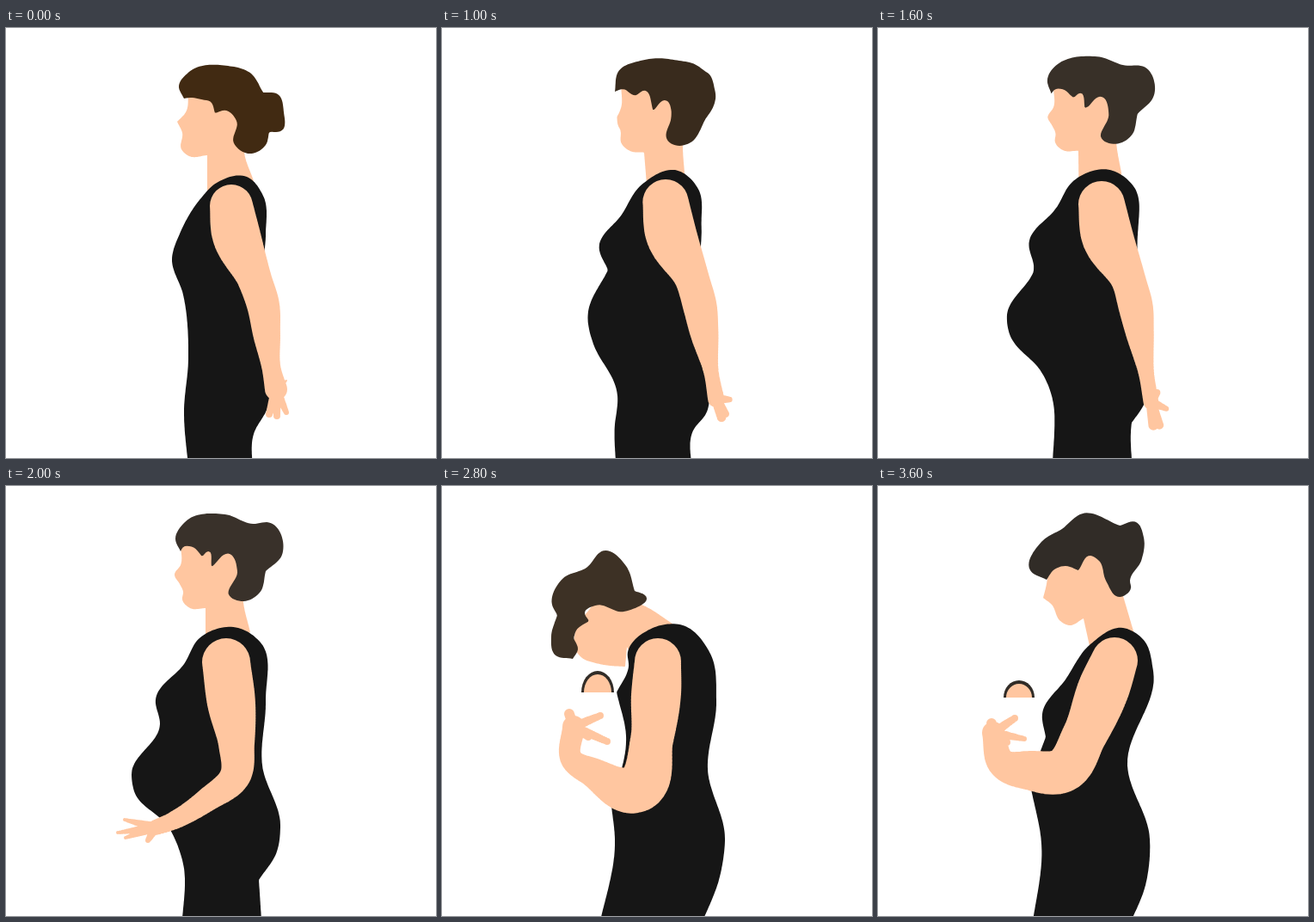
An HTML page for the animation above (3800 ms loop, 500 by 500 pixels).

```html
<!DOCTYPE html>
<html lang="en">
<head>
<meta charset="utf-8">
<title>Motherhood</title>
<style>
  html, body { margin: 0; width: 100%; height: 100%; overflow: hidden; background: #fff; }
  svg { display: block; width: 100%; height: 100%; }
</style>
</head>
<body>
<svg viewBox="0 0 500 500"></svg>
<script>
const LOOP = 3800, STEP = 200, TURN = 3000, SAMPLES = 160;
const SKIN = '#ffc6a0', BLACK = '#161616', BABY_HAIR = '#312c27';

const early = power => u => 1 - (1 - u) ** power;
const late = power => u => u ** power;
const settle = u => u * (3 - u) / 2;
const linear = u => u;

// Outlines are closed curves: "!" is a corner, "|" a landmark kept aligned while morphing.
// The arm is a brush path of x,y,radius from shoulder to palm; tips are the fingers.
const poses = [
  {
    at: 0, tint: [65, 42, 18], ease: { head: late(3), arm: early(4) },
    head: '|234,195! 234,148! 213,149 204,141 205,122 199,109! 209,98 |212,72! 245,60 285,105 277,143 288,178!',
    hair: '|207,82! 201,68 213,51 258,44 285,53 299,75! 316,77 323,98 321,119 306,121! 302,136 282,146 265,134 268,108 256,96 243,99! 238,86 227,83! 215,81',
    dress: '|213,520! 207,445 212,385 206,310 193,268 203,237 225,200 245,180 |280,173 299,195 302,240 296,300 308,385 304,442 288,472 |287,520!',
    arm: '262,207,25 267,238,28 289,292,20 299,322,19 303,355,16 309,398,11 314,420,13',
    tips: '326,447,3 315,451,4 306,449,4 326,410,1'
  },
  {
    at: 600, tint: [65, 42, 18],
    head: '|240,190! 233,144! 216,143 207,130 208,120 203,108 209,99 |211,62! 245,55 282,100 277,138 285,170!',
    hair: '|209,68! 216,49 259,35 286,43 305,41 309,78 320,106 300,127 276,137 261,122 267,94 258,86 243,96! 235,69 229,77! 221,75! 217,66',
    dress: '|213,520! 208,470 213,410 190,355 185,320 199,280! 188,255 212,216 235,180 |275,165 298,188 303,230 299,300 313,405 308,444 291,466 |291,520!',
    arm: '260,198,26 265,232,29 290,290,20 300,322,19 305,352,17 315,402,8 320,424,11',
    tips: '331,410,4 333,422,3 333,434,4 323,443,5'
  },
  {
    at: 1200, tint: [53, 44, 34], ease: { body: early(2), head: early(2), arm: late(8) },
    head: '|238,190! 236,145! 220,143 209,135 208,120! 201,105! 207,93 |207,70! 240,60 275,85 281,130 281,180!',
    hair: '|197,77! 199,52 226,39 268,35 302,48 312,50 321,70 302,101! 290,132 262,133 266,106 261,83 247,97! 236,75 222,79 211,73',
    dress: '|198,520! 197,465 200,430 167,368 161,340 190,282! 180,255 207,218 230,184 |273,166 297,185 301,230 297,300 311,420 308,448 292,470 |291,520!',
    arm: '260,205,27 266,240,30 292,295,20 300,325,20 304,350,17 313,405,9 318,435,9',
    tips: '336,443,3 328,462,5 321,462,6 325,424,4'
  },
  {
    at: 2000, tint: [57, 49, 42],
    head: '|232,190! 232,142! 214,142 205,132 206,123 202,114 196,103 203,92 |203,68! 240,55 277,95 276,135 284,170!',
    hair: '|203,76! 197,62 208,42 255,33 286,44 308,43 321,80 302,99! 295,124 276,134 260,128 269,99 260,79 239,94! 235,76 228,82! 217,71 206,71',
    dress: '|204,520! 205,435 190,398 149,355 146,335 179,277 174,248 207,207 226,176 |270,165 296,182 302,250 298,325 319,395 315,425 294,458! |298,520!',
    arm: '256,205,28 262,252,28 268,300,21 267,336,18 235,364,14 188,392,10 174,397,9',
    tips: '138,388,2 130,403,2 139,409,2 165,412,3'
  },
  {
    at: 2400, tint: [49, 44, 39], ease: { body: settle, head: settle, arm: settle },
    head: '|248,195! 239,154! 222,162 212,157 202,138 192,130! 196,114 |198,90! 240,70 268,90 285,128! 298,172!',
    hair: '|196,109! 177,98 190,65 214,50! 238,32 281,46! 300,42 309,60 306,87 293,110 294,119 281,129 265,110 257,87 247,81 233,98! 218,93 205,97',
    dress: '|178,520! 190,415 178,352! 189,308! 195,292! 191,265 218,225 247,184 |285,165 308,178 320,215 290,325 316,410 312,460 |288,520!',
    arm: '275,203,27 263,234,30 240,290,26 214,331,26 178,331,23 145,323,17 134,287,13',
    tips: '159,270,4 132,276,6 170,294,3 150,298,4',
    baby: [164, 246, 18, 20]
  },
  {
    at: 2800, tint: [61, 49, 37],
    head: '|222,200! 215,187! 213,210! 196,209 179,206 163,200 155,190 155,170 |166,150! 185,130 232,138 268,160!',
    hair: '|152,201! 131,196 127,175 134,150! 128,138 140,108 168,95 189,75 214,93 224,122! 237,128 212,146 178,139 166,147 171,157! 156,168 153,177! 158,190',
    dress: '|181,520! 201,410 197,372! 214,290 203,240! 217,210 216,193 243,166 |280,162 312,195 319,250 309,330 329,410 324,450 |297,520!',
    arm: '251,204,27 249,242,29 244,295,25 226,352,28 175,333,17 151,318,13 153,280,13',
    tips: '184,267,4 148,265,6 192,297,4 170,292,4',
    baby: [181, 240, 19, 25]
  }
];

const mix = (a, b, t) => a + (b - a) * t;
const mixAll = (a, b, t) => a.map((v, i) => mix(v, b[i], t));
const gap = (a, b) => Math.hypot(...a.map((v, i) => b[i] - v));
const toward = (a, b) => a.map((v, i) => (b[i] - v) / (gap(a, b) || 1));

const parse = text => text.split(' ').map(s => ({
  p: s.replace(/[|!]/g, '').split(',').map(Number),
  corner: s.endsWith('!'),
  mark: s.startsWith('|')
}));

// Points of the smooth curve from node i to the next one
function segment(nodes, i, closed) {
  const count = nodes.length;
  const at = k => nodes[(k + count) % count].p;
  const a = at(i), b = at(i + 1), len = gap(a, b), chord = toward(a, b);
  const slope = k => {
    const end = !closed && (k === 0 || k === count - 1);
    if (end || nodes[k % count].corner) return chord;
    const before = gap(at(k - 1), at(k)), after = gap(at(k), at(k + 1));
    const u = toward(at(k - 1), at(k)), v = toward(at(k), at(k + 1));
    const sum = u.map((n, c) => n * after + v[c] * before);
    const size = Math.hypot(...sum) || 1;
    return sum.map(n => n / size);
  };
  const m = slope(i), n = slope(i + 1);
  return Array.from({ length: 17 }, (_, k) => {
    const t = k / 16, u = t * t * (3 - 2 * t);
    const v = t * (1 - t) ** 2 * len, w = t * t * (t - 1) * len;
    return a.map((x, c) => mix(x, b[c], u) + m[c] * v + n[c] * w);
  });
}

function evenly(pts) {
  const dist = [0];
  for (let i = 1; i < pts.length; i++) dist.push(dist[i - 1] + gap(pts[i - 1], pts[i]));
  let j = 1;
  return Array.from({ length: SAMPLES }, (_, i) => {
    const d = dist.at(-1) * i / (SAMPLES - 1);
    while (j < pts.length - 1 && dist[j] < d) j++;
    return mixAll(pts[j - 1], pts[j], (d - dist[j - 1]) / (dist[j] - dist[j - 1] || 1));
  });
}

function outline(text) {
  const nodes = parse(text), runs = [];
  nodes.forEach((node, i) => {
    if (node.mark) runs.push([]);
    runs.at(-1).push(...segment(nodes, i, true));
  });
  return runs.flatMap(evenly);
}

const polygon = pts => 'M' + pts.map(p => p.map(n => n.toFixed(1)).join(' ')).join('L') + 'Z';

const disc = ([x, y, r]) =>
  `M${(x - r).toFixed(2)} ${y.toFixed(2)}a${r} ${r} 0 1 1 ${2 * r} 0a${r} ${r} 0 1 1 ${-2 * r} 0Z`;

function brush(points) {
  const nodes = points.map(p => ({ p }));
  return nodes.slice(1).flatMap((_, i) => segment(nodes, i, false)).map(disc).join('');
}

const dome = (x, y, rx, ry) => `M${x - rx} ${y}A${rx} ${ry} 0 0 1 ${x + rx} ${y}Z`;

const shapes = poses.map(({ head, hair, dress, arm, tips, baby, tint }) => ({
  head: outline(head), hair: outline(hair), dress: outline(dress),
  arm: parse(arm).map(n => n.p), tips: parse(tips).map(n => n.p), baby, tint
}));

function compose(ms) {
  const time = Math.min(ms, 2 * TURN - ms);
  let i = poses.length - 2;
  while (poses[i].at > time) i--;
  const u = (time - poses[i].at) / (poses[i + 1].at - poses[i].at);
  const ease = poses[i].ease || {};
  const blend = (key, part) => {
    const a = shapes[i][key], b = shapes[i + 1][key], t = (ease[part] || linear)(u);
    return Array.isArray(a) && Array.isArray(a[0]) ? a.map((p, k) => mixAll(p, b[k], t)) : mixAll(a || b, b, t);
  };

  // The hanging arm swings back once before it reaches forward
  const swing = i === 2 ? 20 * Math.max(0, Math.sin(2 * Math.PI * u)) : 0;
  const swung = ([x, y, r]) => [x + swing * Math.max(0, (y - 200) / 250), y, r];
  const arm = blend('arm', 'arm').map(swung), tips = blend('tips', 'arm').map(swung);
  const [px, py] = arm.at(-1);
  const fingers = tips.map(tip => brush([[px, py, 6], tip])).join('');

  const hasBaby = shapes[i].baby || (shapes[i + 1].baby && u >= .5);
  const [x, y, rx, ry] = hasBaby ? blend('baby', 'body') : [0, 0, 0, 0];
  return [
    [SKIN, polygon(blend('head', 'head'))],
    [`rgb(${blend('tint', 'head').map(Math.round)})`, polygon(blend('hair', 'head'))],
    [BLACK, polygon(blend('dress', 'body'))],
    [BABY_HAIR, hasBaby ? dome(x, y, rx, ry) : ''],
    [SKIN, hasBaby ? dome(x, y, rx - 3, ry - 4) : ''],
    [SKIN, brush(arm) + fingers]
  ];
}

const frames = Array.from({ length: LOOP / STEP }, (_, n) => compose(n * STEP));
const svg = document.querySelector('svg');
const layers = frames[0].map(() => svg.appendChild(document.createElementNS(svg.namespaceURI, 'path')));

let shown = -1;
const start = performance.now();
function tick() {
  const n = Math.floor((performance.now() - start) % LOOP / STEP);
  if (n !== shown) {
    shown = n;
    frames[n].forEach(([fill, d], k) => {
      layers[k].setAttribute('fill', fill);
      layers[k].setAttribute('d', d);
    });
  }
  requestAnimationFrame(tick);
}
tick();
</script>
</body>
</html>
```
